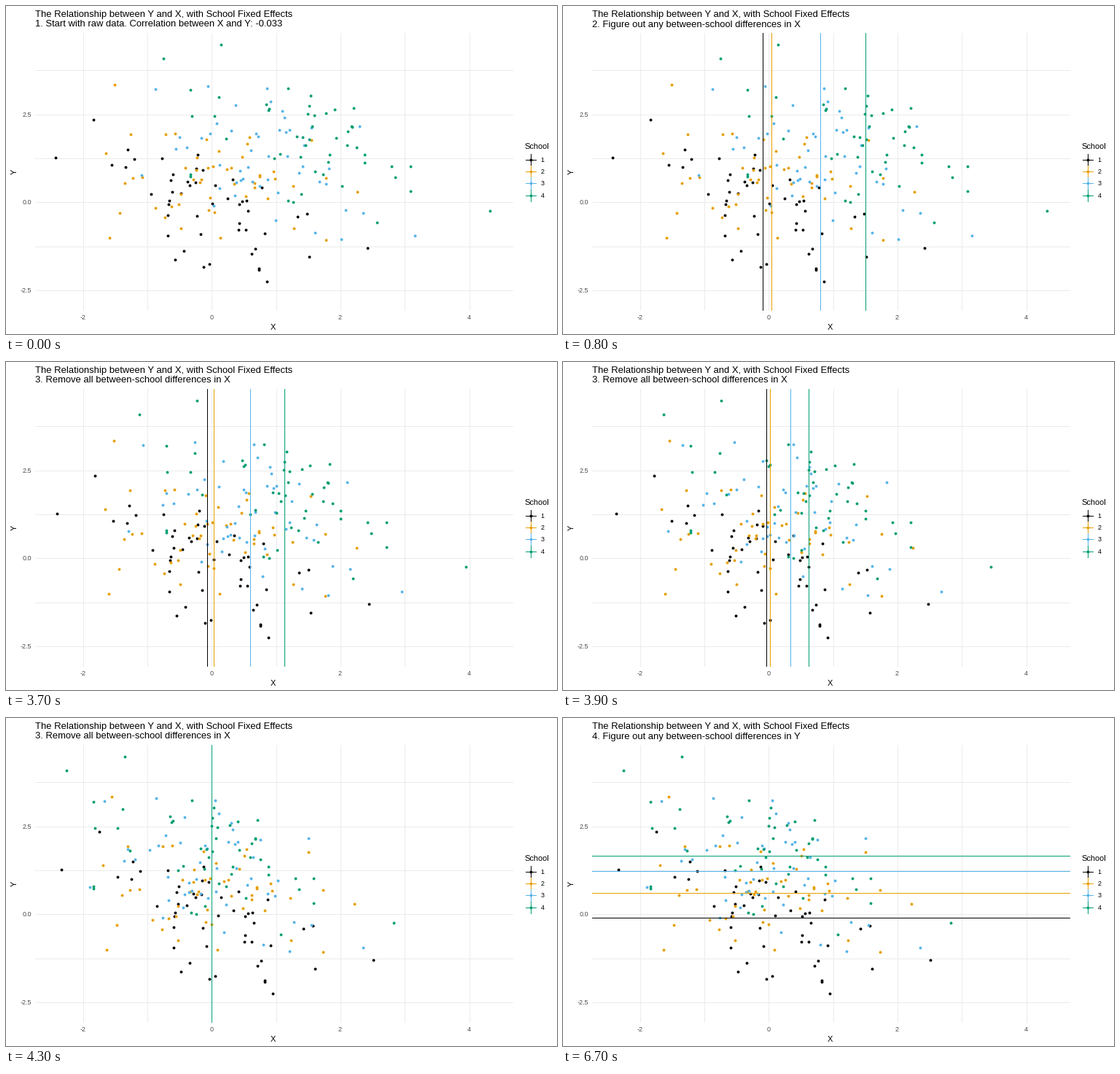
Write a matplotlib script that moves like this. It is 756 px wide and 450 px high and loops after 8 s.

```python
import math

import matplotlib.pyplot as plt
import numpy as np
from matplotlib.animation import FuncAnimation

WIDTH, HEIGHT, DPI = 756, 450, 72
STEP, LOOP = 100, 8000
LEFT, RIGHT, TOP, BOTTOM = 40, 695, 37, 417
COLORS = ["#000000", "#E69F00", "#56B4E9", "#009E73"]
MEAN_X = [-0.09, 0.045, 0.8, 1.5]
MEAN_Y = [-0.1, 0.61, 1.23, 1.665]
PUPILS, SLOPE = 50, -0.45

# The outermost observations of each school; the rest are drawn at random.
OUTLIERS = [
    [(-2.42, 1.27), (2.43, -1.32), (0.86, -2.27)],
    [(-1.51, 3.34), (-1.58, -1.03), (2.27, 0.28)],
    [(-1.09, 0.77), (0.86, 3.24), (3.16, -0.95)],
    [(-0.75, 4.07), (0.15, 4.48), (4.33, -0.26)],
]
TITLES = [
    (0, "1. Start with raw data. Correlation between X and Y: -0.033"),
    (500, "2. Figure out any between-school differences in X"),
    (3500, "3. Remove all between-school differences in X"),
    (6400, "4. Figure out any between-school differences in Y"),
]


def stage_x(x):
    return 282.4 + 88.3 * x


def stage_y(y):
    return 269.3 - 48.24 * y


def centred(rng, count, sd):
    z = np.clip(rng.normal(size=count), -1.9, 1.9)
    return sd * (z - z.mean())


def make_school(rng, mean_x, mean_y, outliers):
    """Observations scattered around a falling line through the school's means."""
    count = PUPILS - len(outliers)
    dx = centred(rng, count, 0.9)
    dy = SLOPE * dx + centred(rng, count, 0.9)
    return np.vstack([outliers, np.column_stack([mean_x + dx, mean_y + dy])])


rng = np.random.default_rng(12)
schools = [make_school(rng, *args) for args in zip(MEAN_X, MEAN_Y, OUTLIERS)]

plt.rcParams["font.family"] = "Liberation Sans"
fig = plt.figure(figsize=(WIDTH / DPI, HEIGHT / DPI), dpi=DPI, facecolor="white")
ax = fig.add_axes([0, 0, 1, 1])
ax.set_xlim(0.5, WIDTH + 0.5)
ax.set_ylim(HEIGHT + 0.5, 0.5)
ax.axis("off")


def line(x0, y0, x1, y1, color, z):
    return ax.plot([x0, x1], [y0, y1], color=color, lw=1, zorder=z,
                   solid_capstyle="butt", antialiased=False)[0]


def vline(x, color, z):
    x = round(stage_x(x))
    return line(x, TOP, x, BOTTOM, color, z)


def hline(y, color, z):
    y = round(stage_y(y))
    return line(LEFT, y, RIGHT, y, color, z)


def label(x, y, text, size, color="black", **kwargs):
    return ax.text(x, y, text, fontsize=size, color=color, **kwargs)


def dots(x, y, color):
    return ax.scatter(x, y, s=15, color=color, linewidths=0, zorder=3)


for x in range(-2, 5):
    vline(x, "#EBEBEB", 1)
    if x % 2 == 0:
        label(stage_x(x), 430.5, str(x), 9, "#4D4D4D", ha="center")
for k in range(-2, 4):
    y = 1.25 * k
    hline(y, "#EBEBEB", 1)
    if k % 2 == 0:
        label(35.5, stage_y(y) + 3.5, f"{y:.1f}", 9, "#4D4D4D", ha="right")
label(367, 444, "X", 11, ha="center")
label(12, 227.5, "Y", 11, rotation=90, ha="center", va="center")
label(40, 16, "The Relationship between Y and X, with School Fixed Effects", 13)
subtitle = label(40, 29, "", 13)

label(712, 197, "School", 11)
for i, color in enumerate(COLORS):
    y = 211 + round(16.2 * i)
    line(713, y, 727, y, color, 2)
    line(720, y - 8, 720, y + 8, color, 2)
    dots([720], [y], color)
    label(734, y + 3.5, str(i + 1), 9)

clouds = [dots([], [], c) for c in COLORS]
x_means = [vline(x, c, 4) for x, c in zip(MEAN_X, COLORS)]
y_means = [hline(y, c, 4) for y, c in zip(MEAN_Y, COLORS)]


def sine_in_out(t):
    return (1 - math.cos(math.pi * min(max(t, 0), 1))) / 2


def draw(frame):
    ms = frame * STEP
    subtitle.set_text([text for start, text in TITLES if ms >= start][-1])

    removed = sine_in_out((ms - 3400) / 900)
    for points, cloud, mean, bar in zip(schools, clouds, MEAN_X, x_means):
        x, y = points.T
        cloud.set_offsets(np.column_stack([stage_x(x - mean * removed), stage_y(y)]))
        bar_x = round(stage_x(mean * (1 - removed)))
        bar.set_xdata([bar_x, bar_x])
        bar.set_visible(800 <= ms < 6400)
    for bar in y_means:
        bar.set_visible(ms >= 6700)
    return [subtitle, *clouds, *x_means, *y_means]


anim = FuncAnimation(fig, draw, frames=LOOP // STEP, interval=STEP,
                     repeat=True, repeat_delay=0, blit=False)
plt.show()
```
